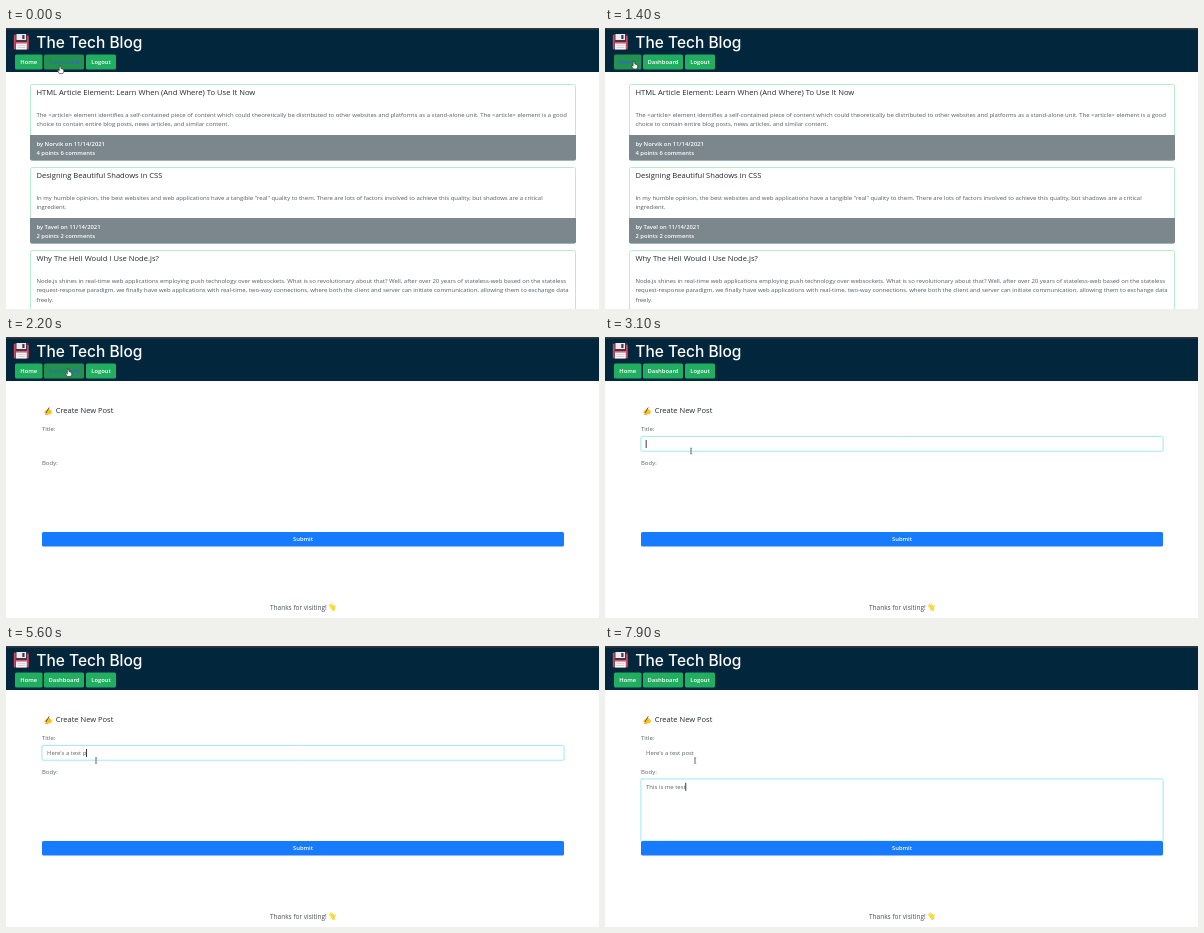
An HTML page with a canvas that plays this animation: 593 by 281 pixels, repeating every 8000 ms.

```html
<!DOCTYPE html>
<html lang="en">
<head>
<meta charset="utf-8">
<title>The Tech Blog</title>
<style>
html, body { margin: 0; width: 100%; height: 100%; overflow: hidden; background: #fff; }
canvas { display: block; width: 593px; height: 281px; }
</style>
</head>
<body>
<canvas id="stage"></canvas>
<script>
const W = 593, H = 281, LOOP = 8000;
const canvas = document.getElementById('stage');
const ctx = canvas.getContext('2d');
const dpr = window.devicePixelRatio || 1;
canvas.width = W * dpr;
canvas.height = H * dpr;

const FONT = '"Open Sans", "Noto Sans", sans-serif';
const TITLE_FONT = 'Inter, "Open Sans", sans-serif';
const SMALL = 5.97, BOLD = 5.85, HEADING = 7.6;
const LINK = '#2a62b4';

const posts = [
  { title: 'HTML Article Element: Learn When (And Where) To Use It Now',
    lines: ['The <article> element identifies a self-contained piece of content which could theoretically be distributed to other websites and platforms as a stand-alone unit. The <article> element is a good',
            'choice to contain entire blog posts, news articles, and similar content.'],
    author: 'Norvik', stats: '4 points 6 comments' },
  { title: 'Designing Beautiful Shadows in CSS',
    lines: ['In my humble opinion, the best websites and web applications have a tangible "real" quality to them. There are lots of factors involved to achieve this quality, but shadows are a critical',
            'ingredient.'],
    author: 'Tavel', stats: '2 points 2 comments' },
  { title: 'Why The Hell Would I Use Node.js?',
    lines: ['Node.js shines in real-time web applications employing push technology over websockets. What is so revolutionary about that? Well, after over 20 years of stateless-web based on the stateless',
            'request-response paradigm, we finally have web applications with real-time, two-way connections, where both the client and server can initiate communication, allowing them to exchange data',
            'freely.'] }
];

const buttons = [
  { label: 'Home', x: 9, w: 27.5 },
  { label: 'Dashboard', x: 38, w: 40 },
  { label: 'Logout', x: 80, w: 30 }
];

// Pointer path: time, x, y
const path = [
  [0, 54, 38], [100, 53, 48], [200, 50, 61], [400, 50, 61], [700, 24, 36],
  [800, 22.5, 33.5], [1300, 22.5, 33.5], [1900, 61, 33], [2000, 62, 32],
  [2300, 62, 32], [2900, 86, 114], [3200, 86, 114], [3300, 88, 114],
  [3500, 90, 114.5], [LOOP, 90, 114.5]
];

// Typed text: time, number of characters shown
const titleKeys = [[4500, 10], [4600, 11], [4700, 12], [4800, 13], [4900, 14],
                   [5500, 15], [5700, 16], [5800, 18]];
const bodyKeys = [[7300, 10], [7400, 11], [7600, 13], [7700, 14], [7900, 15]];

function text(str, x, y, size, color, weight = 400, align = 'left', font = FONT) {
  ctx.font = `${weight} ${size}px ${font}`;
  ctx.textAlign = align;
  ctx.fillStyle = color;
  ctx.fillText(str, x, y);
}

function box(x, y, w, h, r, fill, stroke, line = 1) {
  ctx.beginPath();
  ctx.roundRect(x, y, w, h, r);
  if (fill) { ctx.fillStyle = fill; ctx.fill(); }
  if (stroke) { ctx.strokeStyle = stroke; ctx.lineWidth = line; ctx.stroke(); }
}

function rect(x, y, w, h, color) {
  ctx.fillStyle = color;
  ctx.fillRect(x, y, w, h);
}

function shape(points, fill, stroke, line = 0.7) {
  ctx.beginPath();
  points.forEach(([x, y]) => ctx.lineTo(x, y));
  ctx.closePath();
  ctx.fillStyle = fill;
  ctx.fill();
  if (stroke) {
    ctx.strokeStyle = stroke;
    ctx.lineWidth = line;
    ctx.lineJoin = 'round';
    ctx.stroke();
  }
}

function stroke(points, color, line) {
  ctx.beginPath();
  points.forEach(([x, y]) => ctx.lineTo(x, y));
  ctx.strokeStyle = color;
  ctx.lineWidth = line;
  ctx.lineCap = 'round';
  ctx.stroke();
}

function pointerAt(t) {
  let i = 1;
  while (path[i][0] < t) i++;
  const [t0, x0, y0] = path[i - 1], [t1, x1, y1] = path[i];
  const k = (t - t0) / (t1 - t0);
  return { x: x0 + (x1 - x0) * k, y: y0 + (y1 - y0) * k };
}

// The first nine characters come one per step, the rest by key times.
function typed(str, t, start, keys) {
  let n = t < start ? 0 : Math.min(9, Math.floor((t - start) / 100) + 1);
  for (const [at, count] of keys) if (t >= at) n = count;
  return str.slice(0, n);
}

function floppy() {
  box(7.5, 6, 15.5, 16, 1.5, '#4a3346');
  rect(8, 7, 1.6, 14, '#c94b62');
  rect(21, 8, 1.6, 13, '#c94b62');
  rect(10.5, 6, 9.5, 6, '#e9e9ee');
  rect(16.3, 7, 2.2, 4, '#4a3346');
  rect(10, 14, 10.8, 7.5, '#fbf6f7');
  rect(10, 14, 10.8, 1.6, '#d95a70');
  rect(11.5, 17.4, 7.8, 0.7, '#c9bcc4');
  rect(11.5, 19.3, 7.8, 0.7, '#c9bcc4');
}

function header(p) {
  rect(0, 0, W, 44, '#02263c');
  rect(0, 0, W, 1.7, '#30363a');
  floppy();
  text('The Tech Blog', 30.3, 19.8, 15.5, '#fff', 500, 'left', TITLE_FONT);
  for (const b of buttons) {
    const hot = p.y > 26 && p.y < 41.5 && p.x > b.x && p.x < b.x + b.w;
    box(b.x, 26.5, b.w, 15, 1.6, hot ? '#239150' : '#22ae61');
    text(b.label, b.x + b.w / 2, 36.4, BOLD, hot ? '#2f6bbb' : '#fff', 600, 'center');
  }
}

function feed(p) {
  posts.forEach((post, i) => {
    const y = 56 + i * 83;
    const hot = p.y > y + 3 && p.y < y + 14 && p.x > 30 && p.x < 254;
    box(24.5, y + 0.5, 545, 76, 1.8, '#fff', '#b4eecf');
    text(post.title, 30.4, y + 11.4, HEADING, hot ? LINK : '#24292d', 500);
    post.lines.forEach((line, n) => text(line, 30.4, y + 33 + n * 9.4, SMALL, '#565c61'));
    if (!post.author) return;
    box(24, y + 51, 546, 25.6, [0, 0, 1.8, 1.8], '#7c868d');
    text(`by ${post.author} on 11/14/2021`, 30.4, y + 61.5, BOLD, '#fff', 600);
    text(post.stats, 30.4, y + 70.8, BOLD, '#fff', 600);
  });
}

function field(x, y, w, h, str, focused, baseline) {
  if (focused) {
    box(x, y, w, h, 1.6, null, '#e3f8fe', 2);
    box(x, y, w, h, 1.6, '#fff', '#9fe5f7', 0.8);
  }
  text(str, 41, baseline, SMALL, '#5b6268');
  if (focused) rect(41 + ctx.measureText(str).width - 0.3, baseline - 6, 0.9, 8, '#222');
}

function writingHand() {
  shape([[38, 75], [41, 72.5], [43.5, 72], [46, 74.5], [45, 77], [40.5, 77.5]], '#fcc21b');
  stroke([[40, 75.8], [43, 70.8]], '#5b5145', 1);
  stroke([[39, 77.4], [42, 77.8]], '#e09c1f', 0.7);
}

function wavingHand() {
  shape([[324.5, 271], [325, 268.5], [327.7, 268], [329.3, 271], [328.8, 273.6], [326.8, 274.2]], '#fcd83f');
  [[323.2, 268.5], [324.4, 267.2], [326, 266.9], [329.4, 269]].forEach(([x, y]) =>
    stroke([[x, y], [326.8, 271.5]], '#fcd83f', 1.1));
}

function form(t) {
  const inTitle = t >= 2900 && t < 6000, inBody = t >= 6000;
  writingHand();
  text('Create New Post', 49.7, 76.3, 7.5, '#24292d', 500);
  text('Title:', 36, 94, SMALL, '#5b6268');
  field(36, 99.5, 522, 14.7, typed("Here's a test post", t, 3500, titleKeys), inTitle, 109);
  text('Body:', 36, 127.7, SMALL, '#5b6268');
  field(36, 133, 522, 62, typed('This is me test', t, 6400, bodyKeys), inBody, 142.8);
  box(36, 195, 522, 14.6, 1.6, '#167bff');
  text('Submit', 297, 204.4, BOLD, '#fff', 600, 'center');
  text('Thanks for visiting!', 264, 272.6, 6.5, '#4a5055');
  wavingHand();
}

function hand(x, y) {
  shape([[x - 0.7, y], [x + 0.7, y], [x + 1, y + 2.6], [x + 3.6, y + 3.4], [x + 3.8, y + 5.6],
         [x + 2.8, y + 7.6], [x - 0.6, y + 7.6], [x - 2.6, y + 4.6], [x - 1.8, y + 4], [x - 0.8, y + 4.8]],
        '#fff', '#222', 0.6);
}

function arrow(x, y) {
  shape([[x, y], [x, y + 7], [x + 1.6, y + 5.6], [x + 2.8, y + 8], [x + 3.8, y + 7.5],
         [x + 2.8, y + 5.2], [x + 4.8, y + 5.2]], '#fff', '#222', 0.6);
}

function beam(x, y) {
  stroke([[x, y - 2.6], [x, y + 2.6]], '#444', 0.8);
  stroke([[x - 1, y - 2.8], [x + 1, y - 2.8]], '#777', 0.5);
  stroke([[x - 1, y + 2.8], [x + 1, y + 2.8]], '#777', 0.5);
}

function pointer(t, p) {
  const onForm = t >= 2200;
  if (onForm && p.y > 99) beam(p.x, p.y);
  else if (p.y > 26 && p.y < 41.5 || !onForm && p.y > 59) hand(p.x, p.y);
  else arrow(p.x, p.y);
}

function draw(now) {
  const t = Math.floor((now % LOOP) / 100) * 100;
  const p = pointerAt(t);
  ctx.setTransform(dpr, 0, 0, dpr, 0, 0);
  rect(0, 0, W, H, '#fff');
  header(p);
  if (t < 2200) feed(p);
  else form(t);
  pointer(t, p);
  requestAnimationFrame(draw);
}

requestAnimationFrame(draw);
</script>
</body>
</html>
```
